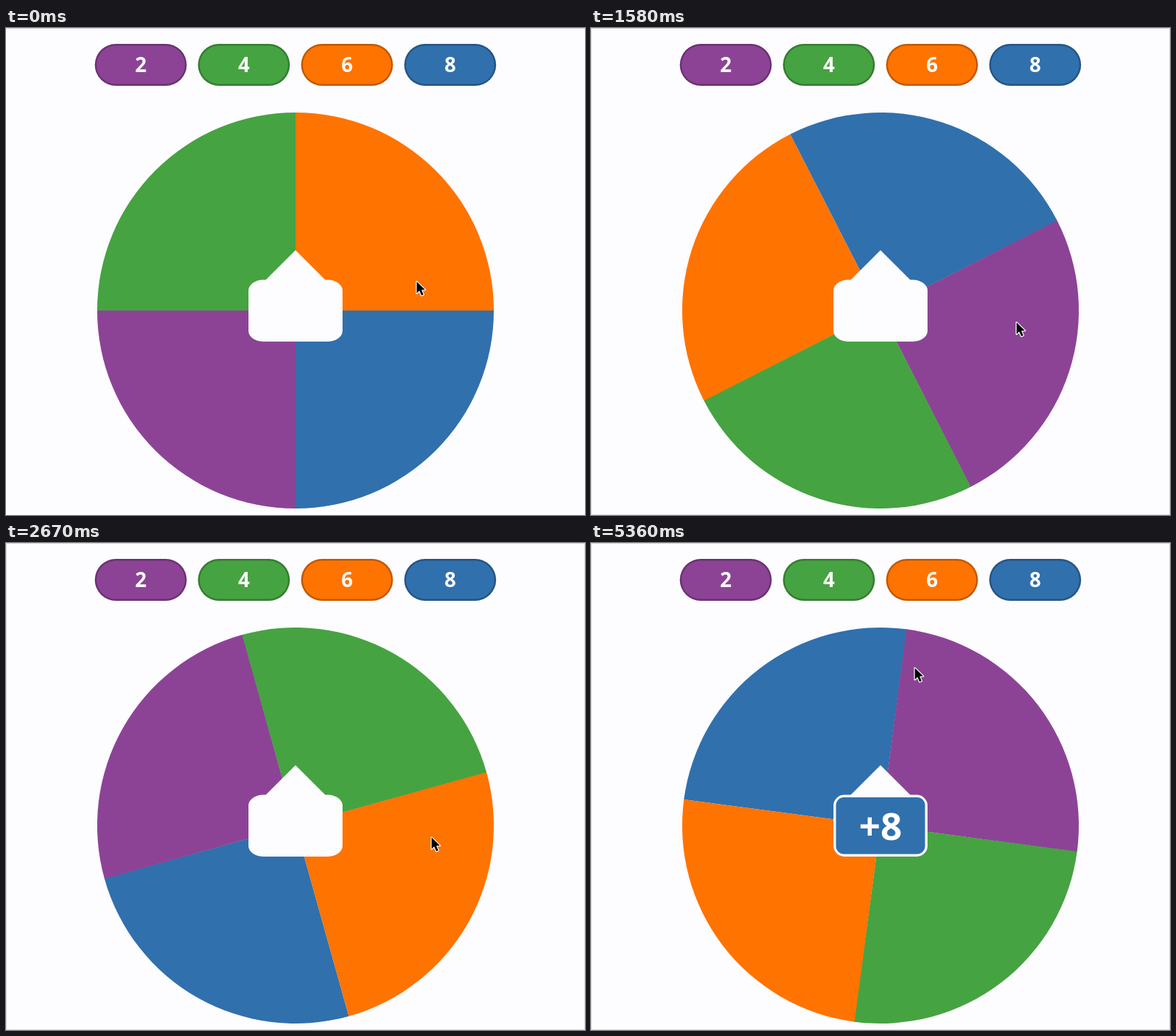
These frames come from a looping animation (800 px wide and 674 px high, 5.45 s). An HTML page with a canvas:

```html
<!DOCTYPE html>
<html lang="en">
<head>
<meta charset="utf-8">
<title>Number spinner</title>
<style>
  html, body { margin: 0; width: 100%; height: 100%; overflow: hidden; background: #fdfcff; }
  canvas { display: block; }
</style>
</head>
<body>
<canvas id="stage" width="800" height="674"></canvas>
<script>
const ctx = document.getElementById('stage').getContext('2d');
const LOOP = 5450;
const BG = '#fdfcff';
const CX = 400, CY = 391, R = 274;
const PURPLE = '#8c4396', GREEN = '#46a341', ORANGE = '#ff7300', BLUE = '#3070ad';
const PILLS = [
  ['2', PURPLE, '#6a3271'],
  ['4', GREEN, '#357c31'],
  ['6', ORANGE, '#c15800'],
  ['8', BLUE, '#255584']
];
const SLICES = [BLUE, PURPLE, GREEN, ORANGE];

// Flick: the wheel is dragged, let go, slows by friction, then stops.
const PRESS = 0.8412, RELEASE = 1.0584, STOP = 3.853;
const START = -1350, DRAG = 160, GRAB = -44.9, REACH = 240;
const LIMIT = 301.25, FRICTION = 1.482;

const rad = deg => deg * Math.PI / 180;
const clamp = x => Math.max(0, Math.min(1, x));
const ease = x => x * x * (3 - 2 * x);
const mix = (a, b, u) => [a[0] + (b[0] - a[0]) * u, a[1] + (b[1] - a[1]) * u];
const dragAngle = t => DRAG * clamp((t - PRESS) / (RELEASE - PRESS)) ** 3;
const onWheel = deg => [CX + REACH * Math.sin(rad(deg)), CY - REACH * Math.cos(rad(deg))];

// 30 ms steps, with one 40 ms step in every 1120 ms
function hold(ms) {
  const block = Math.floor(ms / 1120) * 1120, u = ms - block;
  const extra = u < 280 ? 0 : 10;
  return block + Math.floor((u - extra) / 30) * 30 + extra;
}

function wheelAngle(t) {
  if (t < RELEASE) return START + dragAngle(t);
  return LIMIT - 282.9 * Math.exp(-FRICTION * (Math.min(t, STOP) - 2.18));
}

function pointer(t) {
  const rest = [587.5, 407];
  if (t < PRESS) return mix([567, 350.5], onWheel(GRAB), ease(clamp(t / 0.58)));
  if (t < 1.13) return onWheel(GRAB + dragAngle(t));
  if (t < 4.5) return mix(onWheel(GRAB + DRAG), rest, ease(clamp((t - 1.13) / 0.38)));
  return mix(rest, [447, 172.5], ease(clamp((t - 4.5) / 0.86)));
}

function box(x, y, w, h, r, fill) {
  ctx.beginPath();
  ctx.roundRect(x, y, w, h, r);
  ctx.fillStyle = fill;
  ctx.fill();
}

function label(text, x, y, size) {
  ctx.font = `bold ${size}px "Open Sans", "Noto Sans", sans-serif`;
  ctx.textAlign = 'center';
  ctx.fillStyle = '#fff';
  ctx.fillText(text, x, y);
}

function polygon(points) {
  ctx.beginPath();
  points.forEach(([x, y]) => ctx.lineTo(x, y));
  ctx.closePath();
}

function drawPills() {
  PILLS.forEach(([text, fill, edge], i) => {
    const x = 122.7 + i * 142.5;
    box(x, 22, 127, 58, 29, edge);
    box(x + 2.5, 24.5, 122, 53, 26.5, fill);
    label(text, x + 63.5, 61, 28);
  });
}

function drawWheel(angle) {
  SLICES.forEach((color, i) => {
    const from = rad(angle - 90 + i * 90);
    ctx.beginPath();
    ctx.moveTo(CX, CY);
    ctx.arc(CX, CY, R, from, from + Math.PI / 2 + (i < 3 ? 0.002 : 0));
    ctx.fillStyle = color;
    ctx.fill();
  });
}

function drawHub(stopped) {
  polygon([[400, 307.5], [442, 349.5], [442, 360], [358, 360], [358, 349.5]]);
  ctx.fillStyle = BG;
  ctx.fill();
  if (stopped) {
    box(335, 348.5, 130, 85.5, 15, BG);
    box(338.5, 352, 123, 78.5, 11, BLUE);
    label('+8', 400, 411, 52);
  } else {
    box(335, 348.5, 130, 85.5, { x: 20, y: 15 }, BG);
  }
}

function drawBorder(t) {
  ctx.fillStyle = '#cfced1';
  ctx.fillRect(0, 0, 800, 1);
  if (t < PRESS) return;
  ctx.fillStyle = '#dddce0';
  ctx.fillRect(0, 0, 1, 674);
  ctx.fillRect(799, 0, 1, 674);
  ctx.fillRect(0, 673, 800, 1);
}

function drawPointer([x, y]) {
  ctx.save();
  ctx.translate(x, y);
  polygon([[0.5, 0.5], [0.5, 16.5], [4.2, 13.1], [7, 19.6], [9.8, 18.4], [7, 12], [12, 11.8]]);
  ctx.lineJoin = 'round';
  ctx.lineWidth = 2.4;
  ctx.strokeStyle = '#fff';
  ctx.stroke();
  ctx.fillStyle = '#000';
  ctx.fill();
  ctx.restore();
}

function draw(now) {
  const t = hold(now % LOOP) / 1000;
  ctx.fillStyle = BG;
  ctx.fillRect(0, 0, 800, 674);
  drawBorder(t);
  drawPills();
  drawWheel(wheelAngle(t));
  drawHub(t >= STOP);
  drawPointer(pointer(t));
}

const begin = performance.now();
function tick() {
  draw(performance.now() - begin);
  requestAnimationFrame(tick);
}
tick();
</script>
</body>
</html>
```
